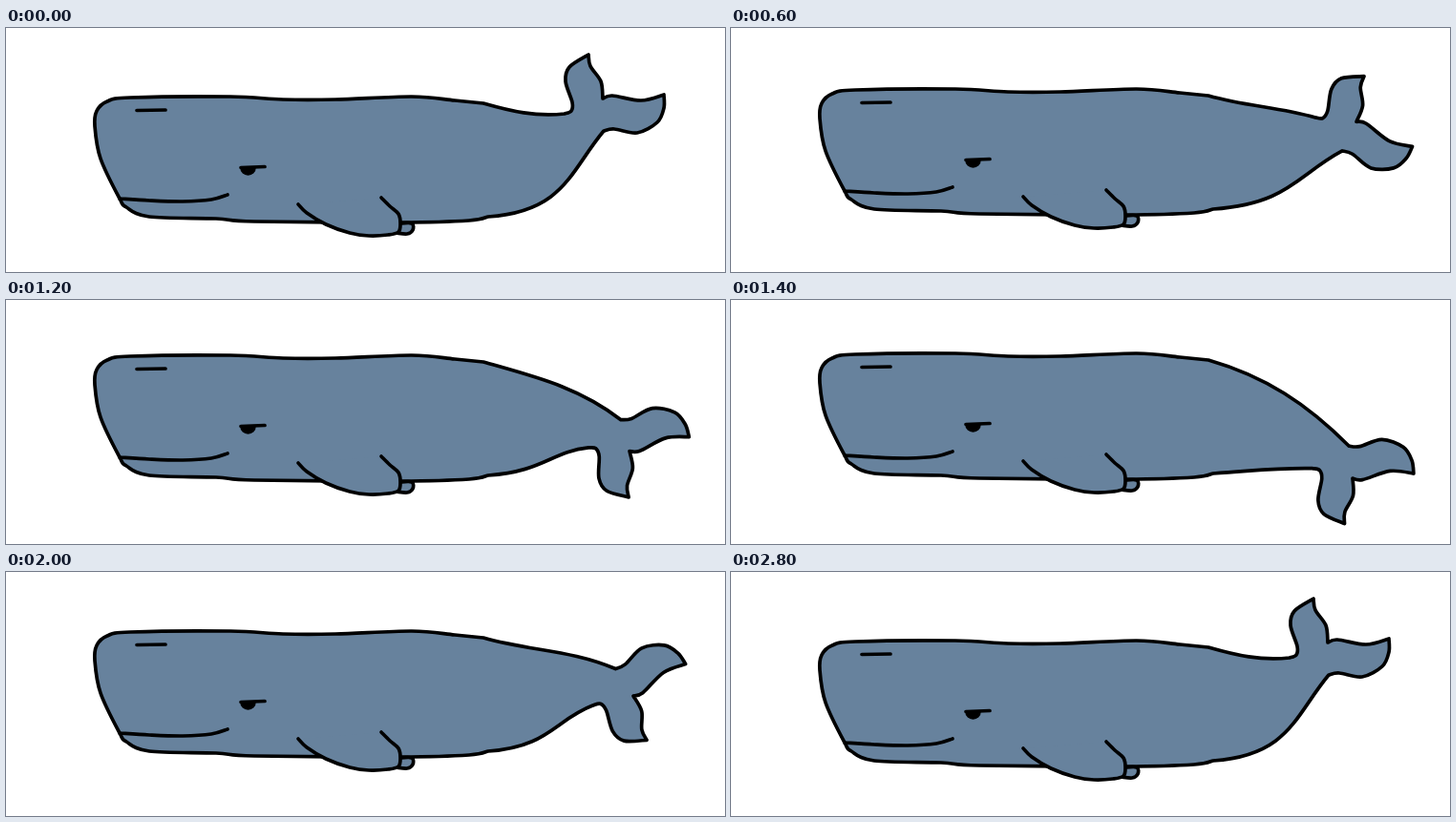
An HTML page with a canvas that plays this animation: 753x256 px, repeating every 3000 ms.

```html
<!DOCTYPE html>
<html lang="en">
<head>
<meta charset="utf-8">
<title>Swimming whale</title>
<style>
html, body { margin: 0; width: 100%; height: 100%; overflow: hidden; background: #fff; }
canvas { display: block; width: 753px; height: 256px; }
</style>
</head>
<body>
<canvas id="stage" width="753" height="256"></canvas>
<script>
const ctx = document.getElementById('stage').getContext('2d');
const SKIN = '#67829d';
const STEP = 200, STEPS = 15, LAST = 7, FLIP_AT = 4;

const rad = deg => deg * Math.PI / 180;
// "x,y x,y" to a list of points
const points = text => text.split(' ').map(p => p.split(',').map(Number));

// Still part of the outline, from the belly round the head to the back
const FRONT = points('505,198 485,202 414,204 260,203 220,200 150,198 126,188 119,179 ' +
  '99,137 93,103 95,87 106,77 130,73 235,72 290,75 345,75 425,72 470,76 500,79');

// Fluke edges around the notch: short outer, short inner, long inner, long outer
const FLUKE = [
  '-40,16 -33,13 -32,4 -39,-18 -35,-33 -15,-46',
  '-15,-46 -13,-34 -2,-18 0,0',
  '0,0 10,-3 40,2 64,-4',
  '64,-4 64,10 57,25 36,36 12,32 1,34'
].map(points);

// The tail sinks while turning, and is seen mirrored in the lower half
function tailAt(n) {
  const m = n - FLIP_AT;
  return m < 0
    ? { x: 625 + 10 * n, y: 74 + 3 * n + 1.7 * n * n, turn: rad(9.2 * n) }
    : { x: 657 - 2 * m, y: 130 + 4.75 * m * (m + 1), turn: rad(9 * m - 35), flip: true };
}

function flukeEdges({ x, y, turn, flip }) {
  const c = Math.cos(turn), s = Math.sin(turn);
  const place = ([px, py]) => {
    if (flip) py = -py;
    return [x + px * c - py * s, y + px * s + py * c];
  };
  const edges = FLUKE.map(edge => edge.map(place));
  return flip ? edges.reverse().map(edge => edge.reverse()) : edges;
}

// Smooth curve through all points, continuing the current path
function curve(p) {
  for (let i = 0; i < p.length - 1; i++) {
    const a = p[i - 1] || p[i], b = p[i], c = p[i + 1], d = p[i + 2] || c;
    ctx.bezierCurveTo(
      b[0] + (c[0] - a[0]) / 6, b[1] + (c[1] - a[1]) / 6,
      c[0] - (d[0] - b[0]) / 6, c[1] - (d[1] - b[1]) / 6,
      c[0], c[1]);
  }
}

// One arc between two points; angles in degrees, pulls relative to the distance
function arc(from, angle1, pull1, to, angle2, pull2) {
  const size = Math.hypot(to[0] - from[0], to[1] - from[1]);
  const handle = ([x, y], angle, pull) =>
    [x + size * pull * Math.cos(rad(angle)), y + size * pull * Math.sin(rad(angle))];
  ctx.bezierCurveTo(...handle(from, angle1, pull1), ...handle(to, angle2, pull2), ...to);
}

function line(text, fill) {
  const p = points(text);
  ctx.beginPath();
  ctx.moveTo(...p[0]);
  curve(p);
  if (fill) ctx.fill();
  ctx.stroke();
}

function drawBody(n, lift) {
  const tail = tailAt(n);
  tail.y -= lift;
  const [upper, inner1, inner2, lower] = flukeEdges(tail);
  const bend = 7.3 * n - 6;
  ctx.beginPath();
  ctx.moveTo(...lower[0]);
  curve(lower);
  arc(lower.at(-1), bend + 136, 0.36, FRONT[0], -4, 0.53);
  curve(FRONT);
  arc(FRONT.at(-1), 16, 0.36, upper[0], bend + 180, 0.36);
  curve(upper);
  curve(inner1);
  curve(inner2);
  ctx.closePath();
  ctx.fill();
  ctx.stroke();
}

function drawDetails() {
  line('137,86.5 167,86');
  line('119,179 150,181 185,182 215,180 232,175');

  // Far fin, then near fin
  line('412,205 425,205 426,212 420,216 409,215', true);
  line('306,185 315,194 335,206 360,215 380,218 400,217 411,214 413,205 411,195 402,187 393,178', true);

  // Eye
  line('246,146.5 271,145.5');
  ctx.fillStyle = '#000';
  ctx.beginPath();
  ctx.arc(253.5, 146.5, 8.3, 0, Math.PI);
  ctx.fill();
}

function draw(now) {
  const step = Math.floor(now / STEP) % STEPS;
  const n = step > LAST ? STEPS - 1 - step : step;
  const lift = n ? -2 - 2 * n : 0;
  ctx.fillStyle = '#fff';
  ctx.fillRect(0, 0, 753, 256);
  ctx.save();
  ctx.translate(0, lift);
  ctx.fillStyle = SKIN;
  ctx.strokeStyle = '#000';
  ctx.lineWidth = 3.7;
  ctx.lineCap = ctx.lineJoin = 'round';
  drawBody(n, lift);
  drawDetails();
  ctx.restore();
}

let start;
function tick(now) {
  if (start === undefined) start = now;
  draw(now - start);
  requestAnimationFrame(tick);
}
draw(0);
requestAnimationFrame(tick);
</script>
</body>
</html>
```
